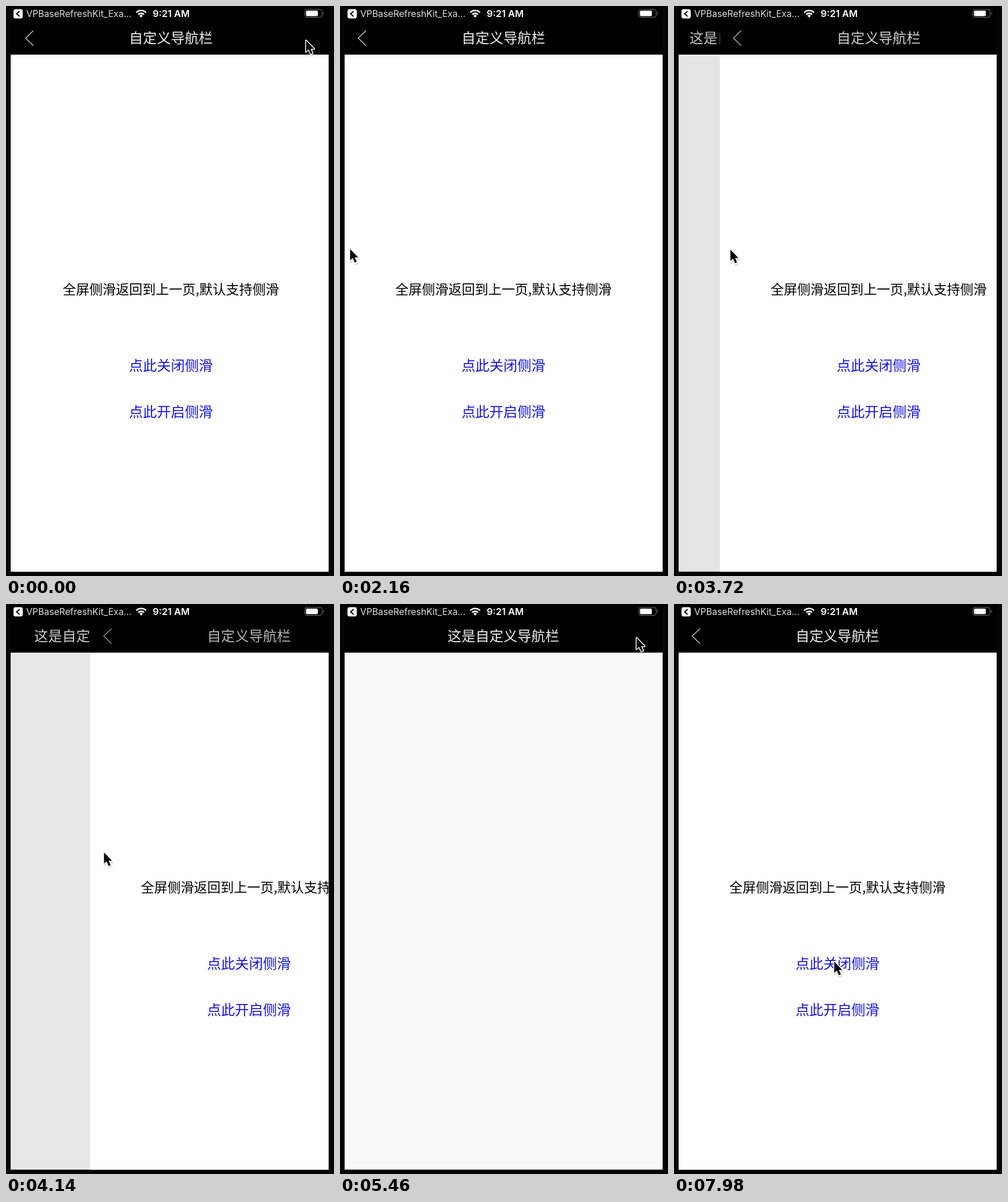
Animation, 568 px wide and 985 px high, one loop 8000 ms. Source, as an HTML page:

```html
<!DOCTYPE html>
<html lang="zh-CN">
<head>
<meta charset="utf-8">
<style>
  html, body { margin: 0; width: 100%; height: 100%; overflow: hidden; background: #050505; }
  svg { display: block; width: 100vw; height: 100vh; }
  text { font-family: "Noto Sans CJK SC", "Noto Sans CJK", sans-serif; }
  .title { font-size: 24.2px; fill: #f0f0f0; text-anchor: middle; }
  .body { font-size: 23px; text-anchor: middle; }
  .link { font-size: 24.2px; fill: #1414e0; text-anchor: middle; }
  .status { font-family: Inter, Roboto, sans-serif; fill: #fff; }
</style>
</head>
<body>
<svg viewBox="0 0 568 985">
  <clipPath id="screen"><path d="M8 0H558.5V977.5H8Z"/></clipPath>
  <g clip-path="url(#screen)">
    <!-- previous page -->
    <path d="M8 0H559V84H8Z"/>
    <path fill="#f9f9f9" d="M8 84H559V978H8Z"/>
    <path id="dim" d="M8 84H559V978H8Z"/>
    <text id="previousTitle" class="title" y="64">这是自定义导航栏</text>

    <!-- sliding page -->
    <g id="page">
      <path d="M8 0H559V84H8Z"/>
      <path fill="#fff" d="M8 84H559V978H8Z"/>
      <g id="barItems">
        <path d="M45 42.5L31.5 55.5L45 68.5" fill="none" stroke="#ddd" stroke-width="1.2"/>
        <text class="title" x="283" y="64">自定义导航栏</text>
      </g>
      <text class="body" x="283" y="497.5">全屏侧滑返回到上一页,默认支持侧滑</text>
      <text class="link" x="283" y="630">点此关闭侧滑</text>
      <text class="link" x="283" y="710">点此开启侧滑</text>
    </g>
  </g>

  <!-- status bar -->
  <rect x="13" y="5.5" width="16" height="16" rx="3.5" fill="#fff"/>
  <path d="M23.5 9L18.5 13.5L23.5 18" fill="none" stroke="#000" stroke-width="2"/>
  <text class="status" x="35" y="19" font-size="15.7" fill-opacity=".88">VPBaseRefreshKit_Exa...</text>
  <path d="M225.5 11.3A12 12 0 0 1 242.5 11.3M229 14.7A7 7 0 0 1 239 14.7" fill="none" stroke="#fff" stroke-width="2.6"/>
  <path d="M231 16.8A4.3 4.3 0 0 1 237 16.8L234 20Z" fill="#fff"/>
  <text class="status" x="254" y="19" font-size="16.4" font-weight="600">9:21 AM</text>
  <rect x="517.5" y="6" width="30" height="13.5" rx="3.5" fill="none" stroke="#777"/>
  <rect x="519.5" y="8" width="20.5" height="9.5" rx="1.8" fill="#fff"/>
  <path d="M549.5 10.5Q552 12.7 549.5 15Z" fill="#777"/>

  <g id="cursor" stroke-linejoin="round">
    <path d="M1 3V22L5.5 18L9 26L12.5 24.5L9 17H15Z" fill="none" stroke="#000" stroke-opacity=".12" stroke-width="4"/>
    <path d="M0 0V19.5L4.5 15.5L8 23.5L11.5 22L8 14.5H14Z" stroke="#fff" stroke-width="3" paint-order="stroke"/>
  </g>
</svg>
<script>
const LOOP = 8000, STEP = 60, WIDTH = 550;
const FIRST_PUSH = -497, DRAG = 2940, DRAG_END = 4680, PUSH = 6031;

// Resting points of the pointer: [time, x, y]
const stops = [
  [0, 519.5, 59.5], [900, 325, 442], [2160, 17.5, 420], [DRAG, 25.5, 420],
  [DRAG_END, 434, 477], [5400, 513.5, 58.5], [6300, 513.5, 58.5],
  [7080, 285, 610], [7980, 277.5, 618]
];

const byId = id => document.getElementById(id);
const set = (id, name, value) => byId(id).setAttribute(name, value);

// A steady drag that ends in a flick; lead is the size of the flick
const drag = (elapsed, lead) => 0.0865 * elapsed + lead * (elapsed / 1560) ** 5;

// Critically damped spring carrying the pushed page into place
function spring(elapsed) {
  const w = elapsed * 0.0152;
  return WIDTH * Math.exp(-w) * (1 + w);
}

function pageOffset(t) {
  if (t >= PUSH) return spring(t - PUSH);
  if (t >= DRAG) return Math.min(WIDTH, drag(t - DRAG, 126));
  return spring(t - FIRST_PUSH);
}

function pointer(t) {
  if (t >= DRAG && t < DRAG_END) {
    const elapsed = t - DRAG;
    return [25.5 + drag(elapsed, 150), 420 + 34 * (elapsed / 1560) ** 5];
  }
  const next = stops.findIndex(stop => stop[0] > t);
  if (next < 0) return stops.at(-1).slice(1);
  const [start, x, y] = stops[next - 1], [end, toX, toY] = stops[next];
  const k = (t - start) / (end - start), eased = k * k * (3 - 2 * k);
  return [x + (toX - x) * eased, y + (toY - y) * eased];
}

function draw(now) {
  const t = Math.floor(now % LOOP / STEP) * STEP;
  const offset = pageOffset(t);
  const covered = 1 - offset / WIDTH;
  const swiping = t >= DRAG && t < PUSH;
  const parallax = WIDTH * (swiping ? 1 / 3 : 0.3);

  set('page', 'transform', `translate(${offset})`);
  set('barItems', 'opacity', covered);
  set('dim', 'opacity', 0.1 * covered);
  set('previousTitle', 'x', 283 - parallax * covered);
  set('previousTitle', 'opacity', 1 - 0.2 * covered);
  set('cursor', 'transform', `translate(${pointer(t)})`);
}

function frame() {
  draw(performance.now());
  requestAnimationFrame(frame);
}
frame();
</script>
</body>
</html>
```
